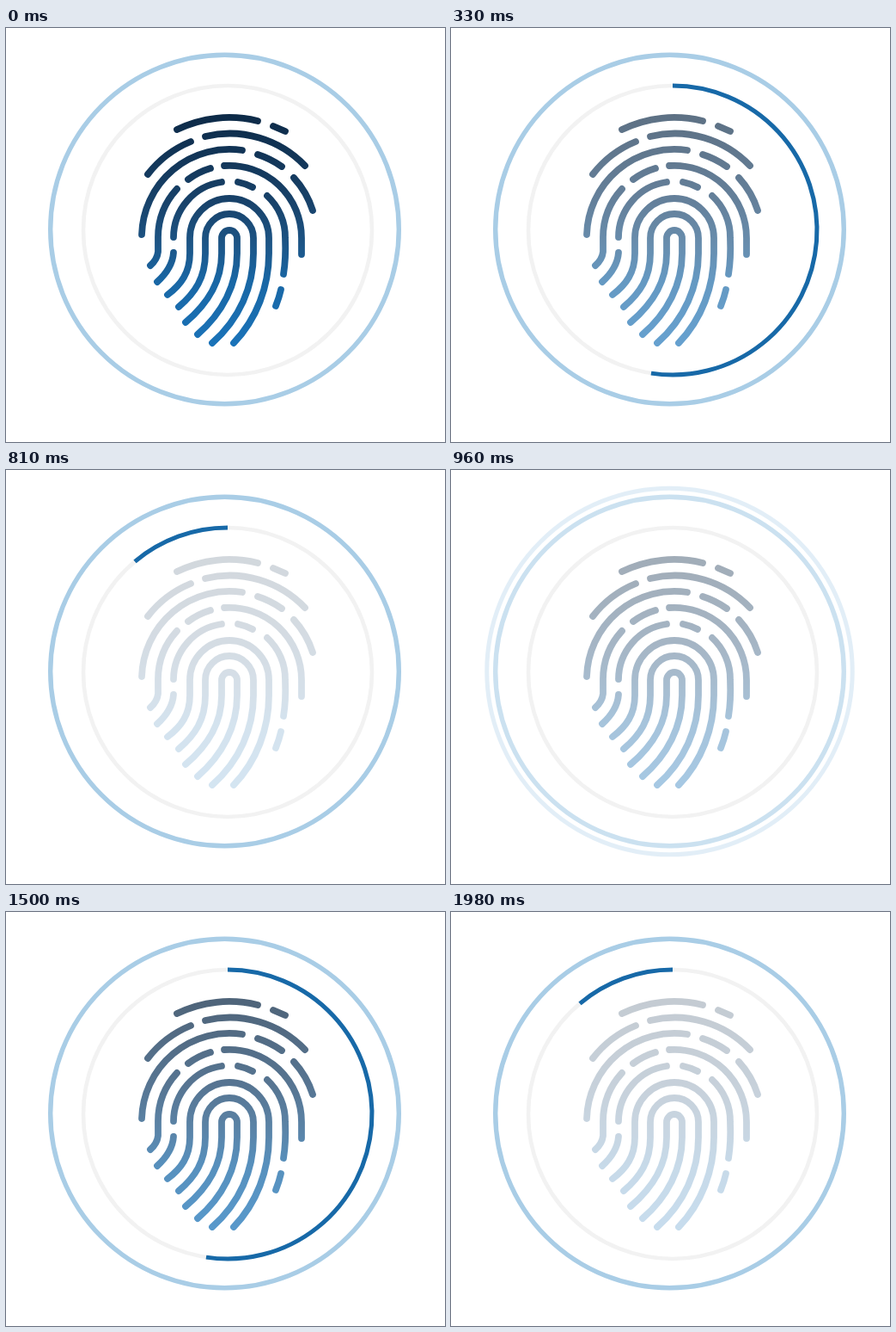
Recreate the animation shown at these times as an HTML page. Size 511 px wide and 481 px high, loop 2010 ms.

```html
<!DOCTYPE html>
<html lang="en">
<head>
<meta charset="utf-8">
<title>Fingerprint scan</title>
<style>
  html, body { margin: 0; width: 100%; height: 100%; overflow: hidden; background: #fff; }
  svg { display: block; width: 511px; height: 481px; }
  svg * { fill: none; }
</style>
</head>
<body>
<svg viewBox="0 0 511 481">
  <defs>
    <linearGradient id="ink" gradientUnits="userSpaceOnUse" x1="0" y1="100" x2="0" y2="370">
      <stop offset="0" stop-color="#0d2a47"/>
      <stop offset=".38" stop-color="#18426a"/>
      <stop offset=".55" stop-color="#1d5484"/>
      <stop offset=".72" stop-color="#1967a5"/>
      <stop offset="1" stop-color="#1a73b9"/>
    </linearGradient>
  </defs>
  <circle id="pulse" cx="254.5" cy="234" r="203" stroke="#a9cde6" stroke-width="5"/>
  <circle id="ring" cx="254.5" cy="234" r="202.8" stroke="#a9cde6" stroke-width="5.4"/>
  <circle cx="258" cy="235" r="168" stroke="#f2f2f2" stroke-width="4.6"/>
  <path id="arc" stroke="#1769a8" stroke-width="5"/>
  <g id="print" stroke="url(#ink)" stroke-width="7.8" stroke-linecap="round" stroke-linejoin="round">
    <path d="M199 118A139 139 0 0 1 293 108M311 114L325 120"/>
    <path d="M165 170A121 121 0 0 1 215 132M232 126A121 121 0 0 1 348 160"/>
    <path d="M158 240A102 102 0 0 1 275 142M293 147A102 102 0 0 1 321 161M335 174A102 102 0 0 1 357 212"/>
    <path d="M199 187A83 83 0 0 0 177 243V260Q176 269 168 276M212 176A83 83 0 0 1 238 163M254 160A84 84 0 0 1 344 244V263"/>
    <path d="M195 243A65 65 0 0 1 251 179M270 179A65 65 0 0 1 287 185M304 195A65 65 0 0 1 325 244Q326 268 323 286M320 304Q318 313 314 323M195 261C194 275 187 285 176 295"/>
    <path d="M188 310C204 298 214 284 214 262V244A46 46 0 0 1 306 244V262C306 300 292 338 265 366"/>
    <path d="M201 324C220 308 232 290 232 262V244A28 28 0 0 1 288 244V262C288 300 272 338 240 366"/>
    <path d="M209 342C235 320 251 295 251 262V244A9 9 0 0 1 269 244V262C269 298 252 331 223 356"/>
  </g>
</svg>
<script>
const LOOP = 2010, STEP = 30, CYCLE = 1170;
const [pulse, ring, arc, print] = ['pulse', 'ring', 'arc', 'print'].map(id => document.getElementById(id));

// Linear interpolation through [time, value] points, held at both ends.
function track(points, t) {
  if (t <= points[0][0]) return points[0][1];
  for (let i = 1; i < points.length; i++) {
    const [a, from] = points[i - 1], [b, to] = points[i];
    if (t <= b) return from + (to - from) * (t - a) / (b - a);
  }
  return points[points.length - 1][1];
}

const HEAD = [[0, 0], [630, 360]];
const TAIL = [[330, 0], [870, 360]];
const INK = [[0, 1], [870, .12], [1170, 1], [1230, 1], [2010, .21]];
const RING = [[870, 1], [960, .6], [1020, .36], [1170, 1]];
const PULSE_R = [[870, 203], [1080, 225.75]];
const PULSE_A = [[870, .6], [1080, 0]];

function point(deg) {
  const a = deg * Math.PI / 180;
  return `${258 + 168 * Math.sin(a)} ${235 - 168 * Math.cos(a)}`;
}

function draw(time) {
  const t = Math.floor(time % LOOP / STEP) * STEP;
  const head = track(HEAD, t % CYCLE), tail = track(TAIL, t % CYCLE);
  const large = head - tail > 180 ? 1 : 0;
  arc.setAttribute('d', head > tail
    ? `M${point(tail)}A168 168 0 ${large} 1 ${point(head)}` : '');
  print.setAttribute('opacity', track(INK, t));
  ring.setAttribute('opacity', track(RING, t));
  pulse.setAttribute('r', track(PULSE_R, t));
  pulse.setAttribute('opacity', t > 870 ? track(PULSE_A, t) : 0);
}

const start = performance.now();
function tick() {
  draw(performance.now() - start);
  requestAnimationFrame(tick);
}
tick();
</script>
</body>
</html>
```
